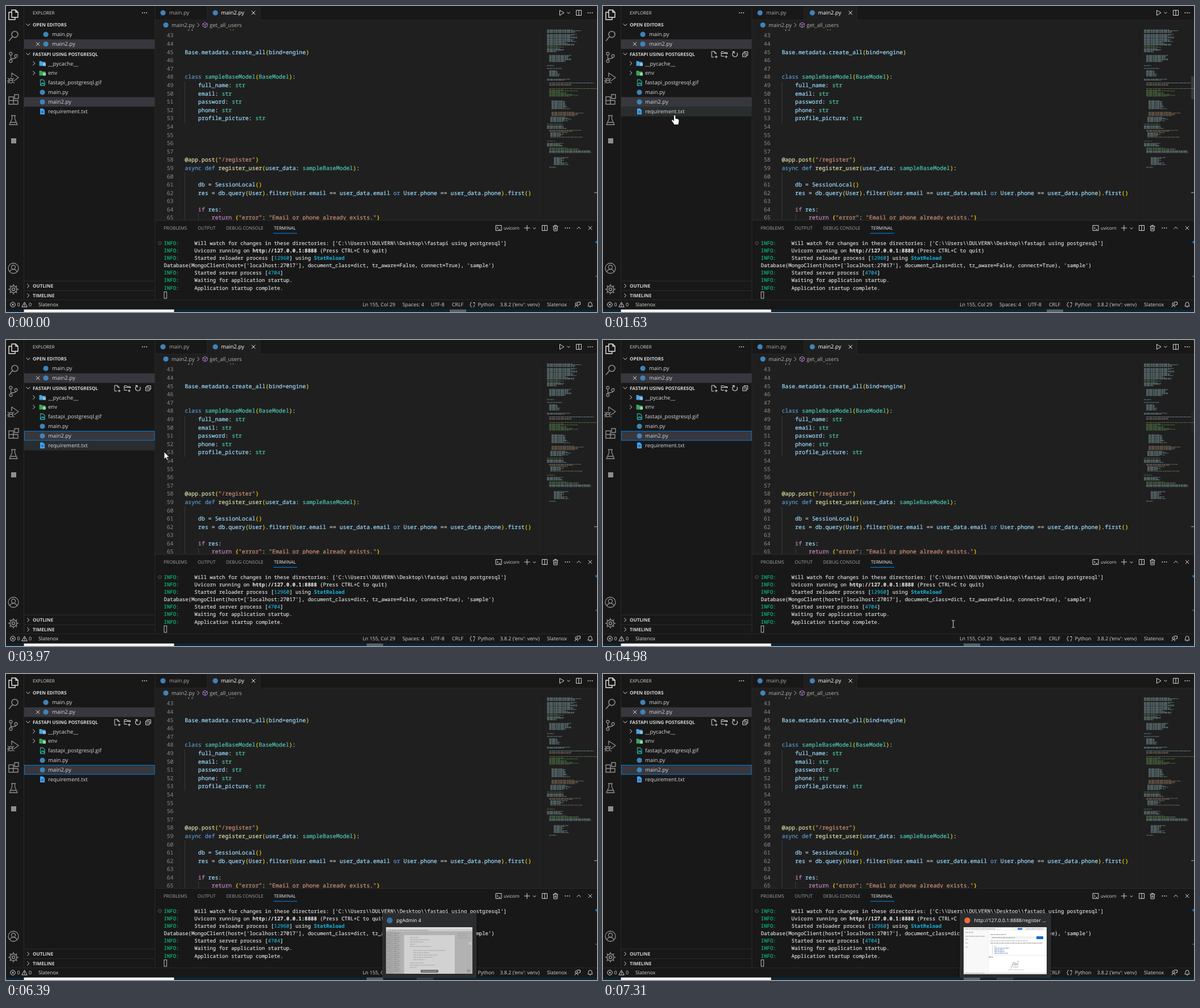
An HTML page that plays this animation: 1039x539 px, repeating every 8000 ms.

```html
<!DOCTYPE html>
<html lang="en">
<head>
<meta charset="utf-8">
<title>Code editor</title>
<style>
html, body { margin: 0; width: 100%; height: 100%; overflow: hidden; background: #181818; }
svg { display: block; width: 1039px; height: 539px; }
text { white-space: pre; text-rendering: geometricPrecision; fill: #d6d6d6; font: 9.5px "Open Sans", "Noto Sans", sans-serif; }
.code { font: 9.867px "Noto Sans Mono", "DejaVu Sans Mono", monospace; }
.term { font: 8.975px "Noto Sans Mono", "DejaVu Sans Mono", monospace; }
.num { text-anchor: end; fill: #8a8a8a; }
.cap { font-size: 8px; }
.head { font-size: 8.2px; font-weight: 700; }
.stat { font-size: 8.8px; }
.tip { font-size: 8.6px; fill: #fff; }
</style>
</head>
<body>
<svg id="stage" viewBox="0 0 1039 539" xmlns="http://www.w3.org/2000/svg"></svg>
<script>
const LOOP = 8000;
const tint = {
  w: '#dcdcdc', v: '#9cdcfe', b: '#569cd6', t: '#4ec9b0', f: '#dcdcaa', y: '#ffd700', m: '#da70d6',
  s: '#ce9178', p: '#c586c0', g: '#0dbc79', c: '#18a8d0'
};

const rect = (x, y, w, h, fill, more = '') =>
  `<rect x="${x}" y="${y}" width="${w}" height="${h}" fill="${fill}" ${more}/>`;
const dot = (x, y, r, fill) => `<circle cx="${x}" cy="${y}" r="${r}" fill="${fill}"/>`;
const line = (d, color = '#d6d6d6', w = 1, more = '') =>
  `<path d="${d}" fill="none" stroke="${color}" stroke-width="${w}" ${more}/>`;
const icon = (x, y, d, color = '#d6d6d6', w = 1) =>
  line(d, color, w, `transform="translate(${x} ${y})" stroke-linejoin="round"`);
const text = (x, y, s, cls = '', fill = '') =>
  `<text x="${x}" y="${y}" class="${cls}"${fill && ` style="fill:${fill}"`}>${s}</text>`;
// Runs are separated by "|"; the first letter of each picks its colour, "!" makes it bold.
const rich = s => s.split('|').map(run => {
  const bold = run[1] === '!', color = tint[run[0]];
  return `<tspan fill="${color}" stroke="${color}" stroke-width=".2"${bold ? ' font-weight="700"' : ''}>${run.slice(bold ? 2 : 1)}</tspan>`;
}).join('');

const chevR = 'M-1.7-3.5L1.7 0L-1.7 3.5', chevD = 'M-3.5-1.7L0 1.7L3.5-1.7', chevU = 'M-3.5 1.7L0-1.7L3.5 1.7';
const cross = 'M-3.2-3.2L3.2 3.2M3.2-3.2L-3.2 3.2';
const split = 'M-4.5-4.5H4.5V4.5H-4.5ZM0-4.5V4.5';
const page = 'M-3.5-5H1L4-2V5H-3.5Z';
const dots = (x, y) => [-3.6, 0, 3.6].map(d => dot(x + d, y, 0.9, '#d6d6d6')).join('');
const py = (x, y) => dot(x, y, 4.6, '#3f83b8');
const rowTop = k => 92.6 + 16.95 * k;

function activityBar() {
  const grey = '#8f8f8f';
  const gear = Array.from({ length: 8 }, (_, i) => {
    const a = i * Math.PI / 4, c = Math.cos(a), s = Math.sin(a);
    return `M${c * 6} ${s * 6}L${c * 9} ${s * 9}`;
  }).join('');
  return rect(0, 0, 31, 534, '#181818') + rect(31, 0, 1, 534, '#2b2b2b') +
    icon(13, 16, 'M-3-9H4L8-5V4H-3ZM4-9V-5H8M-3-5H-8V8H3V4', '#e6e6e6', 1.4) +
    icon(13, 53, 'M8-3A5.5 5.5 0 1 1-3-3A5.5 5.5 0 1 1 8-3M-1.5 1L-8 8.5', grey, 1.5) +
    icon(13, 90, 'M-2-6A2.5 2.5 0 1 1-7-6A2.5 2.5 0 1 1-2-6M-2 7A2.5 2.5 0 1 1-7 7A2.5 2.5 0 1 1-2 7M7-2A2.5 2.5 0 1 1 2-2A2.5 2.5 0 1 1 7-2M-4.5-3.5V4.5M4.5.5Q4 3-4.5 3', grey, 1.3) +
    icon(13, 127, 'M-3-2V-9L9-1L1 5M-1 4.5A3.5 4 0 1 1-8 4.5A3.5 4 0 1 1-1 4.5M-8 4H-1M-10 0L-7.5 2M-11 5H-8M-10 9L-7.5 7M1 0L-1.5 2M2 9L-1.5 7', grey, 1.3) +
    icon(13, 164, 'M-8-4H0V9H-8ZM-8 2.5H8V9H0M8 2.5V9M2-8H9V-1H2Z', grey, 1.4) +
    icon(13, 201, 'M-4-8H4M-2.5-8V-2L-7 8H7L2.5-2V-8M-5 4H5', grey, 1.3) +
    rect(9, 233, 9, 9, grey) +
    icon(13, 462, 'M9 0A9 9 0 1 1-9 0A9 9 0 1 1 9 0M3.5-2A3.5 3.5 0 1 1-3.5-2A3.5 3.5 0 1 1 3.5-2M-6 6Q-5 1.8 0 1.8T6 6', grey, 1.3) +
    icon(13, 499, 'M6 0A6 6 0 1 1-6 0A6 6 0 1 1 6 0M2.5 0A2.5 2.5 0 1 1-2.5 0A2.5 2.5 0 1 1 2.5 0' + gear, grey, 1.5);
}

function sideBar() {
  const folder = (y, color) => `<path d="M58.5 ${y - 4}h4l1.3 1.5h5.4v7h-10.7z" fill="${color}"/>`;
  const names = ['__pycache__', 'env', 'fastapi_postgresql.gif', 'main.py', 'main2.py', 'requirement.txt'];
  return rect(32, 0, 229.5, 534, '#181818') + rect(261.3, 0, 1, 518, '#2b2b2b') +
    text(47, 15, 'EXPLORER', 'cap') + dots(243.5, 12) +
    icon(39, 33, chevD) + text(47, 36, 'OPEN EDITORS', 'head') +
    rect(32, 58.7, 229.5, 17, '#37373d') +
    py(70, 50) + text(81, 53.4, 'main.py') +
    icon(56, 67, cross) + py(70, 67) + text(81, 70.4, 'main2.py') +
    icon(39, 84.5, chevD) + text(47, 87.6, 'FASTAPI USING POSTGRESQL', 'head') +
    '<g id="tools">' +
    icon(195, 85, 'M0 5H-4V-5H1L4-2V0M1-5V-2H4M4 2V7M1.5 4.5H6.5') +
    icon(213, 85, 'M0 3.5H-5V-4.5H-1L0-3H5.5V0M-5-1.5H5.5M3.5 2V7M1 4.5H6') +
    icon(232, 85, 'M3.6-2.4A4.4 4.4 0 1 1-.5-4.3M-4.5-4.6H-1V-1', '#d6d6d6', 1.1) +
    icon(250, 85, 'M-2-2V-4.5H4.5V2H2M-4.5-2H2V4.5H-4.5ZM-3 1.2H.5') + '</g>' +
    `<g id="hover">${rect(32, 0, 229.5, 17, '#2a2d2e')}</g>` +
    rect(32, rowTop(4), 229.5, 17, '#37373d') +
    rect(32.5, rowTop(4) + 0.1, 228.5, 16.2, 'none', 'id="focus" stroke="#0078d4"') +
    icon(49, 101, chevR) + icon(49, 118, chevR) +
    folder(101, '#4aa3df') + rect(65, 100.5, 5, 5, '#8cc4e8') +
    folder(118, '#3fa45b') + rect(65, 117.5, 5, 5, '#9ad6a8') +
    icon(64, 135, page + 'M-3 4L-.5 0L1 2L2.2.5L3.5 4', '#26a69a', 1.3) + py(64, 152) + py(64, 169) +
    '<path d="M60 180.5h5l3 3v7.5h-8z" fill="#42a5f5"/>' + line('M61.8 185.5h4.4M61.8 187.8h4.4', '#173b57', 0.9) +
    names.map((n, k) => text(74, rowTop(k) + 11.9, n)).join('') +
    rect(32, 484, 229.5, 1, '#2b2b2b') + rect(32, 501, 229.5, 1, '#2b2b2b') +
    icon(39, 493, chevR) + text(47, 495.8, 'OUTLINE', 'head') +
    icon(39, 510, chevR) + text(47, 512.8, 'TIMELINE', 'head');
}

const code = {
  42: 'vapp |w= |vFastAPI|y()',
  45: 'vBase.metadata.create_all|y(|vbind|w=|vengine|y)',
  48: 'bclass |tsampleBaseModel|y(|tBaseModel|y)|w:',
  49: 'v    full_name|w: |tstr',
  50: 'v    email|w: |tstr',
  51: 'v    password|w: |tstr',
  52: 'v    phone|w: |tstr',
  53: 'v    profile_picture|w: |tstr',
  58: 'f@app.post|y(|s"/register"|y)',
  59: 'basync def |fregister_user|y(|vuser_data|w: |tsampleBaseModel|y)|w:',
  61: 'v    db |w= |vSessionLocal|y()',
  62: 'v    res |w= |vdb.query|y(|vUser|y)|w.|vfilter|y(|vUser.email |w== |vuser_data.email |bor |vUser.phone |w== |vuser_data.phone|y)|w.|vfirst|y()',
  64: 'p    if |vres|w:',
  65: 'p        return |y{|s"error"|w: |s"Email or phone already exists."|y}'
};

function minimap() {
  let seed = 7;
  const rnd = () => (seed = (seed * 16807) % 2147483647) / 2147483647;
  const A = '#84a3a8', G = '#5f8c50', O = '#9a8068';
  // top, lines, indent, shortest, longest, colour
  return [
    [42, 4, 0, 45, 62, A], [50, 5, 0, 32, 60, A], [58, 8, 0, 24, 58, A], [71, 2, 0, 20, 34, G],
    [75, 4, 0, 14, 32, A], [81, 1, 0, 16, 18, G], [87, 8, 4, 22, 40, A], [105, 1, 0, 12, 13, A],
    [110, 1, 0, 27, 28, A], [114, 7, 4, 12, 20, A], [129, 2, 0, 30, 42, A], [135.5, 1, 4, 78, 79, A],
    [138, 2, 4, 28, 48, O], [145.5, 1, 4, 84, 85, G], [148, 8, 4, 18, 54, G], [167, 10, 8, 18, 34, A],
    [187, 5, 8, 20, 62, O], [196, 6, 6, 16, 38, A], [208, 1, 0, 28, 29, G], [211, 4, 0, 24, 38, A],
    [219, 2, 4, 40, 58, O], [223, 5, 6, 16, 34, A], [231, 1, 6, 56, 57, O], [238, 1, 0, 14, 15, G],
    [242, 4, 0, 20, 34, A], [250, 3, 4, 28, 54, G], [255, 3, 4, 34, 78, A], [267, 9, 12, 14, 30, A], [284, 1, 4, 12, 13, A]
  ].map(([y, n, dx, lo, hi, color]) => line(
    Array.from({ length: n }, (_, i) => `M${951 + dx} ${y + i * 1.55}h${lo + rnd() * (hi - lo)}`).join(''),
    color, 0.9, 'stroke-dasharray="4 .7 6 .9 3 .6" opacity=".8"')).join('');
}

function editor() {
  let out = rect(262.3, 0, 777, 25, '#181818') + rect(262.3, 25, 777, 353, '#1f1f1f') +
    rect(262.3, 24.4, 777, 0.8, '#2b2b2b') + rect(353, 0, 0.8, 25, '#2b2b2b') +
    rect(354, 0, 92, 25.4, '#1f1f1f') + rect(446, 0, 0.8, 25, '#2b2b2b') +
    py(276, 12) + text(287, 15.4, 'main.py', '', '#a6a6a6') +
    py(368, 12) + text(378, 15.4, 'main2.py', '', '#fff') + icon(435, 12, cross, '#eee') +
    icon(977, 12, 'M-3.5-4.5L4 0L-3.5 4.5Z') + icon(989, 12, 'M-2.5-1.2L0 1.2L2.5-1.2') +
    icon(1007, 12, split) + dots(1027, 12) +
    py(281, 33.5) + text(291, 36.9, 'main2.py', '', '#b0b0b0') + icon(338, 33.5, chevR, '#b0b0b0') +
    icon(350, 33.5, 'M0-4.5L4-2.3V2.3L0 4.5L-4 2.3V-2.3ZM-4-2.3L0 0L4-2.3M0 0V4.5', '#b180d7') +
    text(358, 36.9, 'get_all_users', '', '#b0b0b0') +
    '<g clip-path="url(#pane)">' +
    line('M314.5 133V206M314.5 293V378M338.5 366V378', '#404040', 0.8);
  for (let n = 42; n <= 65; n++) {
    const y = 55.4 + 14.595 * (n - 43);
    out += text(294.5, y, n, 'code num');
    if (code[n]) out += text(314.2, y, rich(code[n]), 'code');
  }
  return out + '</g>' + rect(943, 42, 1, 335, '#191919') + minimap() +
    `<g id="bar">${rect(1034, 124, 5, 40, '#797979')}</g>` + rect(1034, 328, 5, 1.4, '#8a8a8a');
}

function panel() {
  const lines = [
    "gINFO:|w     Will watch for changes in these directories: ['C:\\\\Users\\\\DULVERN\\\\Desktop\\\\fastapi using postgresql']",
    'gINFO:|w     Uvicorn running on |w!http://127.0.0.1:8888|w (Press CTRL+C to quit)',
    'gINFO:|w     Started reloader process [|c12960|w] using |c!StatReload',
    "wDatabase(MongoClient(host=['localhost:27017'], document_class=dict, tz_aware=False, connect=True), 'sample')",
    'gINFO:|w     Started server process [|c4704|w]',
    'gINFO:|w     Waiting for application startup.',
    'gINFO:|w     Application startup complete.'
  ];
  const tabs = [[277, 'PROBLEMS'], [337, 'OUTPUT'], [387, 'DEBUG CONSOLE'], [471, 'TERMINAL']];
  return rect(262.3, 377, 777, 141, '#181818') + rect(262.3, 377, 777, 1, '#2b2b2b') +
    tabs.map(([x, s]) => text(x, 394.3, s, 'cap', x === 471 ? '#f0f0f0' : '#a3a3a3')).join('') +
    rect(470, 399.8, 42, 1.2, '#0078d4') +
    icon(866, 391, 'M-5-4.5H5V4.5H-5ZM-3-2L-.8 0L-3 2M0 2.5H3') + text(875, 394, 'uvicorn', 'head" font-weight="400', '').replace('head"', 'cap"') +
    icon(916, 391, 'M-5 0H5M0-5V5') + icon(929, 391.5, 'M-2.5-1.2L0 1.2L2.5-1.2') +
    icon(947, 391, split) + icon(966, 391, 'M-4.5-3H4.5M-1.5-3V-4.7H1.5V-3M-3.5-3L-3 5H3L3.5-3M-1-1V3M1-1V3') +
    dots(987, 391) + icon(1007, 391, chevU) + icon(1027, 391, cross) +
    '<circle cx="270.5" cy="417.5" r="2.6" fill="none" stroke="#5e5e5e"/>' +
    lines.map((s, i) => text(277.5, 421.2 + 13.05 * i, rich(s), 'term')).join('') +
    rect(278, 503.5, 4.6, 11.5, 'none', 'stroke="#ccc" stroke-width=".9"') +
    rect(1036.5, 414, 2.5, 4, '#0078d4') + rect(1036.5, 475, 2.5, 2, '#5a5a5a');
}

function statusBar() {
  const items = [[19.5, '0'], [40, '0'], [57, 'Slatenox'], [627, 'Ln 155, Col 29'], [697, 'Spaces: 4'], [747, 'UTF-8'],
    [784, 'CRLF'], [829.5, 'Python'], [868.5, "3.8.2 ('env': venv)"], [951, 'Slatenox']];
  return rect(0, 517.5, 1039, 17, '#181818') + rect(0, 517.3, 1039, 0.9, '#2b2b2b') +
    icon(12, 526, 'M4.3 0A4.3 4.3 0 1 1-4.3 0A4.3 4.3 0 1 1 4.3 0M-1.8-1.8L1.8 1.8M1.8-1.8L-1.8 1.8') +
    icon(32.5, 526, 'M0-4.3L4.7 4H-4.7ZM0-1.5V1.6M0 2.4V3.2') +
    items.map(([x, s]) => text(x, 529.3, s, 'stat')).join('') +
    icon(820, 526, 'M-1.5-4.3Q-3-4.3-3-2.5T-4.5 0Q-3 .5-3 2.5T-1.5 4.3M1.5 4.3Q3 4.3 3 2.5T4.5 0M1-3.5H4V-1') +
    icon(1005, 526, 'M-1-4.5H4.5V0H2.5L.5 2M-.5-1A1.8 1.8 0 1 1-4-1A1.8 1.8 0 1 1-.5-1M-5 4.5Q-4.5 1.5-2.2 1.5T.5 4.5') +
    icon(1027, 526, 'M-4 2.8Q-3 1.5-3-1A3 3.3 0 0 1 3-1Q3 1.5 4 2.8ZM-1 4.3H1');
}

const taskBar = () => rect(0, 534.4, 1039, 5, '#0c2535') + rect(31.5, 534.6, 264, 5, '#f5f5f5') +
  `<g id="app">${rect(0, 534.6, 29, 5, '#53636f')}</g><g id="task">${rect(0, 534.6, 29.5, 5, '#2b404d')}</g>`;

// Window previews are drawn from x = 0 and moved as a whole.
const rows = (x, y, n, gap, widths, color, w = 0.9) =>
  line(Array.from({ length: n }, (_, i) => `M${x} ${y + i * gap}h${widths[i % widths.length]}`).join(''), color, w, 'stroke-dasharray="5 .8 3 .7"');
function preview(id, w, color, title, body) {
  return `<g id="${id}">` + rect(-4, 419, w + 8, 115, '#000', 'opacity=".13"') +
    rect(0, 421.5, w, 113, '#2b2c2d', 'stroke="#3c3d3e" stroke-width=".7"') +
    dot(12.5, 434, 5.2, color) + text(24.5, 437, title, 'tip') + body + '</g>';
}
const client = () => rect(6, 446, 146, 82.5, '#fff') + rect(6, 446, 146, 6, '#f0f0f0') +
  rows(9, 449, 1, 1, [52], '#999') + rect(72, 447.3, 20, 3.2, '#fff') + rect(101, 447.5, 8, 3, '#1a73d9') +
  rows(116, 449, 1, 1, [30], '#999') + rect(6, 452, 43, 74, '#f8f8f8') + rect(49, 452, 0.5, 74, '#ddd') +
  rows(9, 455, 2, 7, [14, 35], '#888') + rows(9, 467, 3, 7, [5], '#aaa') +
  rows(53, 459, 1, 1, [28], '#777') + rect(53, 462, 78, 4.5, '#f1f1f1') + rows(56, 464.3, 1, 1, [40], '#888') +
  rect(134, 462, 12, 5, '#1567d3') + rows(53, 470, 1, 1, [66], '#999') + rows(53, 474, 1, 1, [92], '#777') +
  line('M56.5 478V494', '#bbb', 0.6) + rows(60, 480, 5, 3, [2, 26, 17, 18, 25], '#527aa8') +
  rows(50, 498.5, 1, 1, [8], '#666') + line('M50 495.5H152', '#ddd', 0.6) +
  line('M89 519L94 507L99 512L103 505M91 512h12M93 516h9', '#aaa', 1) + dot(97, 511, 2.5, '#c9c9c9') +
  rows(84, 521, 1, 1, [28], '#bbb') + rect(6, 525.7, 146, 2.8, '#eee') + rows(9, 527, 1, 1, [34], '#aaa');
const database = () => rect(6, 446, 152, 82, '#b2b2b2') + rect(6, 446, 152, 3, '#dedede') + rect(6, 449, 152, 4, '#cbcbcb') +
  rows(10, 451.5, 1, 1, [70], '#8a8a8a') + rect(6, 454, 13, 74, '#a4a4a4') + rect(19, 454, 13, 74, '#acacac') +
  rows(20, 457, 20, 3.5, [9, 6, 10, 8], '#858585') + rows(8, 460, 9, 7, [7, 4], '#8f8f8f') +
  rect(38, 460, 89, 68, '#d2d2d2') + rows(48, 464, 5, 4, [16, 34, 24, 9, 38], '#9a9a9a') +
  rows(54, 487, 5, 4, [57, 28, 42, 35, 20], '#9a9a9a') + rows(48, 509, 3, 4, [25, 45, 12], '#a0a0a0') +
  rect(67, 521, 31, 5, '#686868', 'rx="1"') + rows(70, 523.5, 1, 1, [25], '#bbb') +
  rows(132, 457, 3, 4, [20, 16, 22], '#949494') + rect(152, 472, 4, 5, '#c6c6c6') + rect(148, 520, 6, 5, '#999');
const mail = () => rect(6, 446, 154, 82, '#303030') + rect(6, 446, 154, 4, '#cdc9e4') + rect(9, 446.5, 28, 3.5, '#fff') +
  rect(6, 450, 154, 4, '#f7f7f7') + rows(12, 452, 1, 1, [58], '#888') + rows(140, 452, 1, 1, [16], '#777') +
  rows(9, 464, 8, 7, [13, 9], '#3d3d3d') + rows(133, 464, 9, 7, [19], '#3d3d3d') +
  rect(38, 460, 91, 68, '#f5f5f5') + rows(52, 472, 2, 3.5, [64, 12], '#777') +
  rows(57, 482, 4, 3.5, [58, 42, 24, 25], '#777') + rows(52, 499, 1, 1, [44], '#777') + rows(55, 505, 1, 1, [30], '#777') +
  rect(67, 521.5, 31, 5.5, '#333', 'rx="1"') + rows(70, 524.3, 1, 1, [25], '#bbb') + rect(158, 454, 2, 43, '#ddd');

const pointer = (id, d, more) => `<path id="${id}" d="${d}" ${more}/>`;
const solid = 'fill="#fff" stroke="#111" stroke-width=".8" stroke-linejoin="round"';

document.getElementById('stage').innerHTML =
  '<clipPath id="pane"><rect x="262" y="41.6" width="682" height="335.6"/></clipPath>' +
  editor() + panel() + sideBar() + activityBar() + statusBar() + taskBar() +
  preview('client', 159, '#ef6a38', 'http://127.0.0.1:8888/register ...', client()) +
  preview('mail', 167, '#dc4a3d', 'Inbox (3,304) - torvelmaniquesh...', mail()) +
  preview('database', 164.5, '#39709c', 'pgAdmin 4', database()) +
  pointer('arrow', 'M0 0V12.8L2.9 10.1L4.9 14.6L7 13.7L5 9.3H9Z', solid) +
  pointer('hand', 'M-1.6 1.5a1.6 1.6 0 0 1 3.2 0V6l4 1q2.4.7 2.2 3l-.8 4.5V17H-1.8v-2L-5.2 10.5q-1-1.8.6-2.2 1.2-.2 3 1.8z', solid) +
  pointer('beam', 'M-2.5-6.5Q0-6.5 0-5V5Q0 6.5-2.5 6.5M2.5-6.5Q0-6.5 0-5M2.5 6.5Q0 6.5 0 5', 'fill="none" stroke="#ddd"') +
  pointer('sash', 'M-7 0l3-3v2.2h8V-3l3 3-3 3V.8h-8V3z', solid);

// Each burst of motion: start, end, number of pictures.
const bursts = [[400, 1180, 11], [1280, 1630, 6], [1630, 2020, 6], [2090, 2710, 9], [3970, 4750, 11], [4820, 5050, 4],
  [5530, 5850, 5], [5850, 6320, 7], [6390, 6780, 6], [6780, 7150, 6], [7230, 7310, 2]];
const path = [[0, 790, 545], [400, 780, 520], [700, 560, 400], [1180, 262, 456], [1280, 244, 430], [1630, 126, 192],
  [2020, 132, 168], [2710, 132, 168], [3970, 278, 197], [4750, 318, 377], [4820, 335, 395], [5050, 714, 537],
  [5530, 714, 537], [5850, 726, 538], [6320, 738, 540], [6624, 764, 540], [7310, 712, 540]];
const shade = [[0, 0], [400, 0], [560, 0.4], [1430, 0.4], [2020, 0], [3970, 0], [4130, 0.4], [4750, 0.4], [5050, 0]];
const hoverTask = [[5050, 692], [6006, 722], [6624, 751], [6702, 722], [6780, 692]];
const slides = [
  { id: 'client', from: 5530, keys: [[5530, 628, 0.45], [5690, 628, 1], [5850, 628, 1]] },
  { id: 'mail', from: 5928, keys: [[5928, 640, 1], [6006, 648, 1], [6162, 655, 1]] },
  { id: 'database', from: 6390, keys: [[6390, 662, 1], [6468, 673, 1], [6624, 683, 1]] },
  { id: 'mail', from: 6702, keys: [[6702, 668, 1], [6780, 655, 1]] },
  { id: 'client', from: 6928, keys: [[6928, 648, 1], [7002, 639, 1], [7150, 632, 1], [7230, 629, 1], [7310, 628, 1]] }
];

function snap(t) {
  let q = 0;
  for (const [a, b, n] of bursts) {
    const step = (b - a) / (n - 1);
    if (t >= a) q = Math.min(b, a + Math.floor((t - a) / step + 1e-6) * step);
  }
  return q;
}
function at(keys, t) {
  const i = keys.findIndex(k => k[0] > t);
  if (i < 0) return keys[keys.length - 1].slice(1);
  if (i === 0) return keys[0].slice(1);
  const a = keys[i - 1], b = keys[i], u = (t - a[0]) / (b[0] - a[0]);
  const e = u * u * (3 - 2 * u);
  return a.slice(1).map((v, k) => v + (b[k + 1] - v) * e);
}
const last = (list, test) => list.filter(test).pop();

const $ = id => document.getElementById(id);
const show = (id, on) => { $(id).style.display = on ? '' : 'none'; };
const move = (id, x, y = 0, more = '') => $(id).setAttribute('transform', `translate(${x} ${y}) ${more}`);

function pointerKind(x, y) {
  if (Math.abs(x - 262) < 3 && y < 517) return 'sash';
  if (x > 300 && Math.abs(y - 377) < 3) return 'sash';
  if (x < 262) return x > 32 && y > 42 && y < 195 ? 'hand' : 'arrow';
  if (x > 300 && x < 1030 && ((y > 41 && y < 377) || (y > 405 && y < 517))) return 'beam';
  return 'arrow';
}

function draw(t) {
  const q = snap(t + 0.01);
  const [x, y] = at(path, q);
  const kind = pointerKind(x, y);
  for (const id of ['arrow', 'hand', 'beam', 'sash']) show(id, id === kind);
  move(kind, x, y, kind === 'sash' && x > 300 ? 'rotate(90)' : '');

  const focused = q >= 2090;
  show('tools', q >= 1280);
  show('focus', focused);
  move('app', focused ? 634 : 780);

  // The row highlight trails the pointer as it leaves the list.
  const lag = q >= 3970 && q < 4040;
  const row = lag ? 5 : Math.floor((y - rowTop(0)) / 16.95);
  show('hover', lag || (x < 262 && row >= 0 && row < 6));
  move('hover', 0, rowTop(row));
  $('bar').style.opacity = at(shade, q)[0];

  const task = last(hoverTask, h => q >= h[0] - 1);
  show('task', task);
  if (task) move('task', task[1]);

  const slide = last(slides, s => q >= s.from - 1);
  for (const id of ['client', 'mail', 'database']) show(id, slide && slide.id === id);
  if (slide) {
    const [sx, alpha] = at(slide.keys, q);
    move(slide.id, sx);
    $(slide.id).style.opacity = alpha;
  }
}

function tick() {
  draw(performance.now() % LOOP);
  requestAnimationFrame(tick);
}
tick();
</script>
</body>
</html>
```
